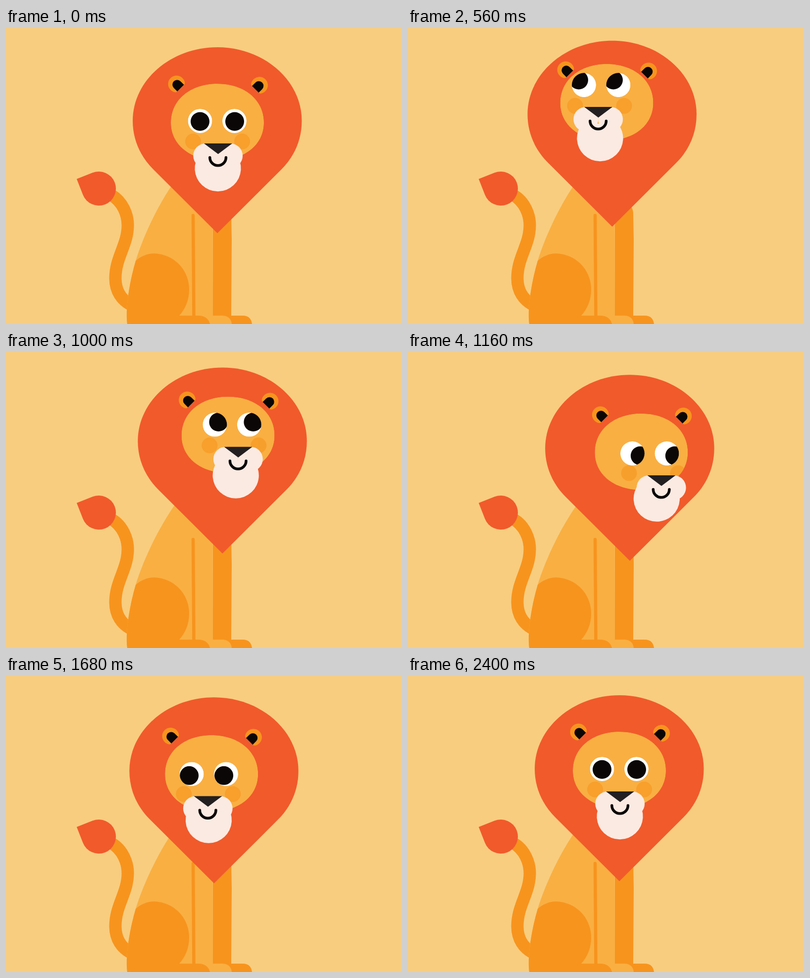
These frames come from a looping animation (800 by 600 pixels, 2.44 s). An HTML page:

```html
<!DOCTYPE html>
<html lang="en">
<head>
<meta charset="utf-8">
<title>Lion looking around</title>
<style>
  html, body { margin: 0; width: 100%; height: 100%; overflow: hidden; background: #f8cd7f; }
  svg { display: block; width: 100%; height: 100%; }
  .light { fill: #f9af42; }
  .orange { fill: #f7941e; }
  .red { fill: #f15a2b; }
  .cream { fill: #fbeae2; }
  .black { fill: #0b0706; }
  .line { fill: none; stroke: #f7941e; stroke-linecap: round; }
</style>
</head>
<body>
<svg viewBox="0 0 800 600">
  <defs>
    <path id="face" d="M427 113C481 113 521 145 521 192C521 236 483 268 427 268C371 268 333 236 333 192C333 145 373 113 427 113Z"/>
    <clipPath id="inFace"><use href="#face"/></clipPath>
    <g id="whites"><circle cx="392" cy="188.5" r="24.5"/><circle cx="461.5" cy="188.5" r="24.5"/></g>
    <clipPath id="inEyes"><circle cx="392" cy="188.5" r="24.5"/><circle cx="461.5" cy="188.5" r="24.5"/></clipPath>
    <g id="ear">
      <path class="orange" d="M-14 9A17 17 0 1 1 14 9Q13 11 10 11H-10Q-13 11 -14 9Z"/>
      <path class="black" d="M-9.5 11V1A9.5 9.5 0 0 1 9.5 1V11Z"/>
    </g>
  </defs>

  <path class="line" stroke-width="25" d="M212 338C236 352 246 378 246 400C246 440 221 465 221 507C221 535 235 552 252 561"/>
  <path class="red" transform="translate(187.5 325.5) rotate(-21.3)" d="M-34.5 -34.5H0A34.5 34.5 0 1 1 -34.5 0Z"/>
  <path class="orange" d="M418 340H436Q455 362 455 376L456 430L455 583H480Q495 584 497 600H418Z"/>
  <path class="light" d="M350 297C310 352 280 415 262 472C248 520 241 572 245 600H456C455 588 447 583 436 583H418L417.500 340Z"/>
  <path class="line" stroke-width="6.500" d="M378 380L379.500 590"/>
  <path class="orange" d="M262 472C272 463 285 457 300 457C340 459 370 490 370 530C370 552 362 570 350 583H388C402 583 410 590 412 600H245C241 572 248 520 262 472Z"/>

  <!-- data-depth: parallax factors for left, right, up, down -->
  <path class="red" data-depth=".33 .253 .178 .46" d="M427 39C521 39 597.500 106 597.500 188C597.500 226 583 260 556 287L427 416L298 287C271 260 256 226 256 188C256 106 333 39 427 39Z"/>
  <g data-depth=".59 .53 .39 .86">
    <use href="#ear" transform="translate(345 114) rotate(-45)"/>
    <use href="#ear" transform="translate(511.500 116.500) rotate(45)"/>
  </g>
  <g data-depth=".58 .53 .54 .73" clip-path="url(#inFace)">
    <use href="#face" class="light"/>
    <g class="orange" opacity=".6" data-depth=".34 .29 .435 .24">
      <circle cx="378" cy="230" r="16"/><circle cx="477" cy="230" r="16"/>
    </g>
  </g>
  <g data-depth=".83 .735 .985 1.07" clip-path="url(#inEyes)">
    <use href="#whites" fill="#fff"/>
    <g class="black" data-depth=".24 .185 .15 .23">
      <circle cx="392" cy="189.500" r="19"/><circle cx="462" cy="189.500" r="19"/>
    </g>
  </g>
  <path class="cream" data-depth=".91 .89 .825 .79" d="M392 255A46.600 46.600 0 1 0 464 255Z"/>
  <g data-depth="1 1 1 1">
    <g class="cream"><circle cx="403.300" cy="259" r="25"/><circle cx="453.100" cy="259" r="25"/></g>
    <path fill="#231f20" d="M400 234H457L428.500 255.500Z"/>
    <path d="M411.800 262.500A16.300 16.300 0 0 0 444.400 262.500" fill="none" stroke="#0b0706" stroke-width="5.500" stroke-linecap="round"/>
  </g>
</svg>
<script>
  const LOOP = 2440, STEP = 40;
  // Nose offsets as [ms, px]; the other layers follow by depth.
  const lookX = [[0, 0], [300, -78], [560, -44], [880, -5], [1140, 84], [1480, 17], [1700, -21], [1940, 0], [LOOP, 0]];
  const lookY = [[0, 0], [560, -74], [880, -74], [1160, 16], [1310, 26], [1480, 20], [1680, 9.5], [1920, 0], [LOOP, 0]];

  const layers = [...document.querySelectorAll('[data-depth]')]
    .map(el => ({ el, depth: el.dataset.depth.split(' ').map(Number) }));

  const slope = (keys, i) => (keys[i + 1][1] - keys[i][1]) / (keys[i + 1][0] - keys[i][0]);

  function tangent(keys, i) {
    if (i === 0 || i === keys.length - 1) return 0;
    const a = slope(keys, i - 1), b = slope(keys, i);
    return a * b <= 0 ? 0 : 2 * a * b / (a + b);
  }

  // Monotone cubic interpolation: no overshoot between keys.
  function sample(keys, t) {
    const i = keys.findIndex((key, n) => n && t < key[0]) - 1;
    const [t0, p0] = keys[i], [t1, p1] = keys[i + 1];
    const d = t1 - t0, s = (t - t0) / d, r = 1 - s;
    return p0 * r * r * (1 + 2 * s) + p1 * s * s * (1 + 2 * r)
      + d * s * r * (tangent(keys, i) * r - tangent(keys, i + 1) * s);
  }

  function draw(now) {
    const t = Math.floor(now % LOOP / STEP) * STEP;
    const x = sample(lookX, t), y = sample(lookY, t);
    for (const { el, depth: [left, right, up, down] } of layers) {
      const dx = x * (x < 0 ? left : right), dy = y * (y < 0 ? up : down);
      el.setAttribute('transform', `translate(${dx} ${dy})`);
    }
    requestAnimationFrame(draw);
  }
  draw(0);
</script>
</body>
</html>
```
